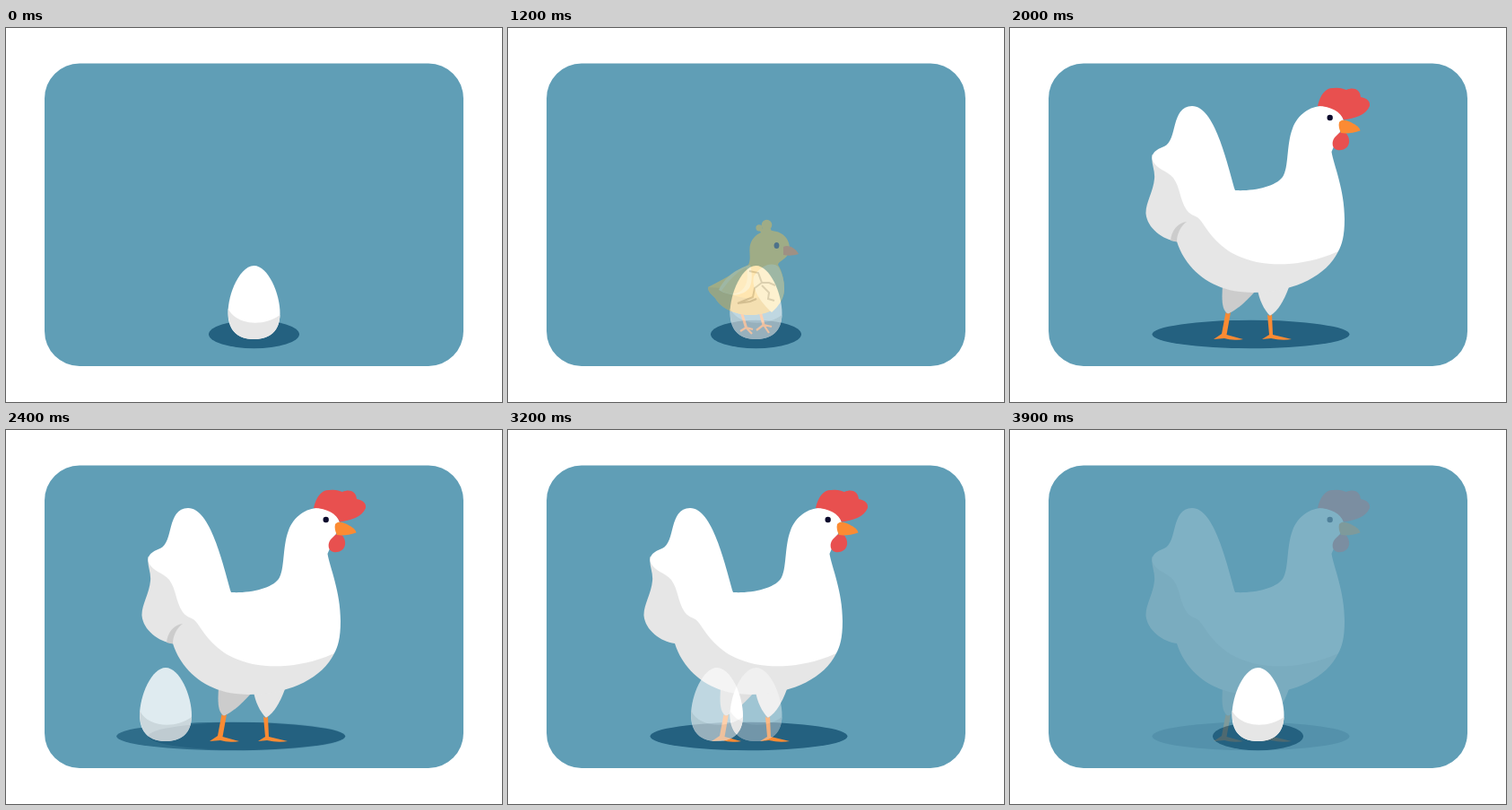
These frames come from a looping animation (553x417 px, 4000 ms). An HTML page:

```html
<!DOCTYPE html>
<html lang="en">
<head>
<meta charset="utf-8">
<title>Life cycle</title>
<style>
  html, body { margin: 0; height: 100%; overflow: hidden; background: #fff; }
  svg { display: block; width: 553px; height: 417px; }
</style>
</head>
<body>
<svg viewBox="0 0 553 417">
  <defs>
    <g id="ground">
      <path fill="#fff" d="M0 0H553V417H0Z"/>
      <rect x="43" y="39.5" width="467" height="337.5" rx="39" fill="#609eb6"/>
    </g>
    <g id="smallGround">
      <use href="#ground"/>
      <ellipse cx="276.5" cy="341.5" rx="50.5" ry="15.7" fill="#246180"/>
    </g>
    <g id="largeGround">
      <use href="#ground"/>
      <ellipse cx="268.5" cy="341.5" rx="110" ry="15.7" fill="#246180"/>
    </g>

    <g id="egg">
      <path fill="#fff" d="M276.5 265C292 265 305.5 296 305.5 318C305.5 338 294 347 276.5 347S247.5 338 247.5 318C247.5 296 261 265 276.5 265Z"/>
      <path fill="#e6e6e6" d="M247.6 313C257 332 288 333 305.4 320C305 338 294 347 276.5 347S247 338 247.6 313Z"/>
    </g>

    <g id="chick">
      <g fill="none" stroke="#fb8b3c" stroke-width="3" stroke-linejoin="round">
        <path d="M260 316L265.500 334M281 316L285 331"/>
        <path stroke-width="2.200" d="M259 338L265.500 334L273 336M265.500 334L272 341M277 337L285 331L294 333M285 331L291 340"/>
      </g>
      <g fill="#ffc33f">
        <circle cx="288.500" cy="219.500" r="5.800"/>
        <circle cx="280" cy="222.800" r="3.600"/>
        <path d="M279 224L292 222L295 229H283Z"/>
        <path d="M292 226C306 226 314 235 314 246C314 257 302 259 301 264C306 272 308 282 308 291C308 309 292 320 269 320C251 319 237 312 231 301C227 297 223 294 223 289C238 281 256 271 268 264C271 258 269 252 269.500 246C270 234 280 226 292 226Z"/>
      </g>
      <path fill="#e5b03f" d="M223 289L240 290C253 304 276 303 291 297L297 313C290 318 280 320 269 320C251 319 237 312 231 301C227 297 223 294 223 289Z"/>
      <path fill="#fcde8a" d="M274 277C282 264 296 260 302 267C306 274 308 282 308 291C308 301 302 310 294 317C282 306 271 291 274 277Z"/>
      <path fill="#fcde8a" d="M270 264C252 269 240 281 235 292C248 300 262 299 269 290C273 282 272 272 270 264Z"/>
      <path fill="#ffc33f" d="M266 267C268 278 267 287 260 293C253 298 244 297 238 293C245 283 254 272 266 267Z" opacity=".55"/>
      <path fill="#fb7d3b" d="M307 244C313 241 321 246 324 252C318 254 312 254 307 253Z"/>
      <ellipse cx="299.500" cy="242.500" rx="2.900" ry="3.500" fill="#33304a"/>
    </g>

    <g id="hen">
      <path fill="#ccc" d="M237 288C236 303 236 314 243 319C255 313 264 304 274 293Z"/>
      <path fill="#e6e6e6" d="M276 292C278 303 283 314 290 321C299 315 305 305 311 289Z"/>
      <path fill="#fb8b33" d="M240.500 317Q243 320 246 317L241.500 342L260 347Q248 349 239 346L227 347L236 341Z"/>
      <path fill="#fb8b33" d="M287 319.500Q289.500 322 292 319.500L293 342L314 347Q303 349 291 346L281 347L289 342Z"/>
      <path fill="#e6e6e6" d="M158.500 141C157 151 162 159 161 168C160 182 151 195 151.500 207C153 223 170 236 186 238C196 270 226 295 270 295C314 295 352 278 366 249L300 205L200 180Z"/>
      <path fill="#fff" d="M203 87C228 87 242 150 251 181C272 182 296 177 304 166C311 156 308 130 315 112C321 96 335 87 348 87C362 87 371 95 372 104L367 118L358.500 138C361 153 373 180 373 213C373 232 370 242 366 249C340 261 306 267 275 261C234 252 222 227 212 214C207 208 202 210 197 203C189 191 190 178 182 167C175 159 164 158 159 148C156 138 167 134 172 132C187 126 179 87 203 87Z"/>
      <path fill="#e8504f" d="M343 87C346 73 353 66 361 67C368 66 371 68 375 69C382 66 390 67 391 77C397 78 402 81 401 87C397 97 384 101 372 102.500C369 94 358 87 343 87Z"/>
      <path fill="#e8504f" d="M367 117C374 113 379 121 378 128C377 134 371 137 365 136C359 135 358 127 362 122Z"/>
      <path fill="#fb8b33" d="M367 105C370 101 376 103 380 105C386 108 390 111 390.500 114.500C383 117 375 118 369 117C367 113 366 109 367 105Z"/>
      <circle cx="356.700" cy="100" r="3.200" fill="#0c0a2c"/>
    </g>
    <path id="vent" fill="#ccc" d="M197 216C187 217 180 226 179 237L186 238.500C186 230 190 221 197 216Z"/>

    <g id="scene0"><use href="#smallGround"/><use href="#egg"/></g>
    <g id="scene1">
      <use href="#scene0"/>
      <path class="crack" fill="none" stroke="#c8c8c8" stroke-width="2" d="M269 271L279 273L283 284L275 290M283 284L291 284"/>
    </g>
    <g id="scene2">
      <use href="#scene0"/>
      <path class="crack" fill="none" stroke="#c8c8c8" stroke-width="2" d="M269 271L279 273L283 284L275 290L273 300L256 307L270 305L277 302M283 284L291 284L298 287M283 287L291 295L290 302L297 304"/>
    </g>
    <g id="scene3"><use href="#smallGround"/><use href="#chick"/></g>
    <g id="scene4"><use href="#largeGround"/><use href="#hen"/><use href="#vent"/></g>
    <g id="scene5">
      <use href="#ground"/>
      <ellipse cx="250.700" cy="341.500" rx="127.500" ry="15.700" fill="#246180"/>
      <use href="#hen"/><use href="#vent"/><use href="#egg" x="-98.500"/>
    </g>
    <g id="scene6"><use href="#largeGround"/><use href="#hen"/><use href="#egg" x="-43.500"/></g>
    <g id="scene7"><use href="#largeGround"/><use href="#hen"/><use href="#egg"/></g>
  </defs>
  <use id="current" href="#scene0"/>
  <use id="next" href="#scene1" opacity="0"/>
</svg>
<script>
  const SCENES = 8, STEPS = 5, STEP_MS = 100;
  const current = document.getElementById('current');
  const next = document.getElementById('next');
  const start = performance.now();
  let shown = 0;

  // Every scene dissolves into the following one in five even steps.
  function draw(now) {
    const step = Math.floor(Math.max(0, now - start) / STEP_MS) % (SCENES * STEPS);
    const scene = Math.floor(step / STEPS);
    if (scene !== shown) {
      current.setAttribute('href', '#scene' + scene);
      next.setAttribute('href', '#scene' + (scene + 1) % SCENES);
      shown = scene;
    }
    next.setAttribute('opacity', step % STEPS / STEPS);
    requestAnimationFrame(draw);
  }
  requestAnimationFrame(draw);
</script>
</body>
</html>
```
